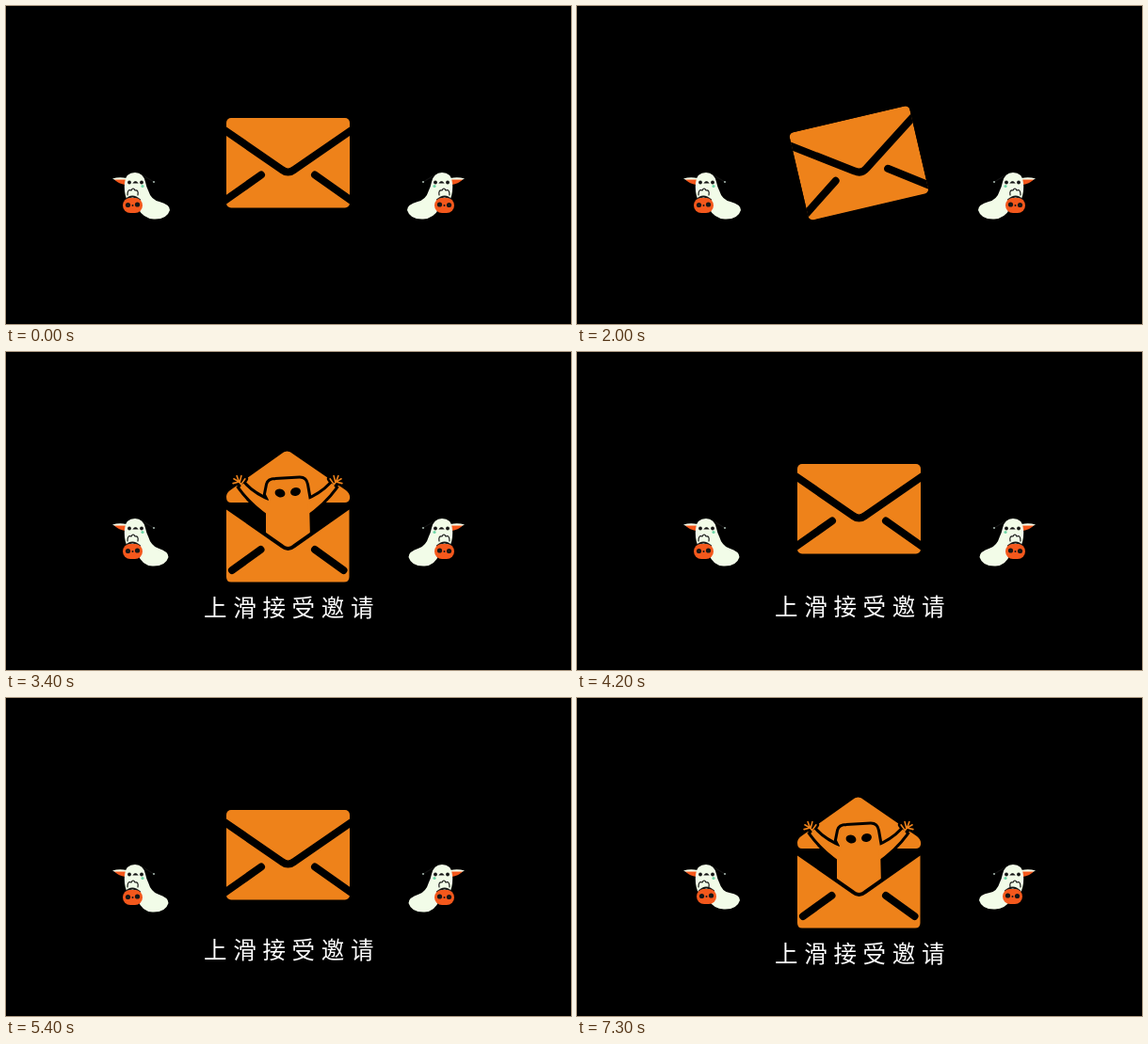
Write an HTML page that moves like this. It is 600 px wide and 338 px high and loops after 7.35 s.

```html
<!DOCTYPE html>
<html lang="zh">
<head>
<meta charset="utf-8">
<style>
  html, body { margin: 0; width: 100%; height: 100%; overflow: hidden; background: #000; }
  svg { display: block; width: 100vw; height: 100vh; }
  text { font: 24.5px "Noto Sans CJK SC", "Noto Sans CJK", sans-serif; letter-spacing: 6.7px; fill: #fff; }
  .orange { fill: #ee821a; }
  .line { fill: none; stroke-linecap: round; stroke-linejoin: round; }
  .ink { stroke: #000; stroke-width: 8; }
  .glow { stroke: #ee821a; }
  .thin { stroke: #161616; stroke-width: 1.2; }
</style>
</head>
<body>
<svg viewBox="0 0 600 338">
  <defs>
    <clipPath id="card"><rect x="234" y="119" width="131" height="95.5" rx="5"/></clipPath>
    <path id="hand" d="M4 5L0 0L-8 2M0 0L-7 -4M0 0L-3 -8M1 0L3 -8M3 3L8 -4"/>
    <path id="arm"/>
    <path id="body" d="M279 141Q280 137 286 137L312 135.5Q317 135.5 318 141L321 158L322 199L299 212L277 199V166L280 157L277 151Z"/>
    <g id="spook">
      <path d="M113 183.5Q120 181.5 128 183L128 187L120 187Z" fill="#f4fbe9"/>
      <path d="M115 184.5L127 184.5L126.500 190Q120 189 115 184.500Z" fill="#f4581c"/>
      <path class="line thin" d="M147 181L157 187" stroke-opacity=".8"/>
      <circle cx="157" cy="187" r="1.1" fill="#9fb0a8"/>
      <path id="sheet" fill="#f2fce8"/>
      <g fill="#161616">
        <circle cx="131" cy="187.5" r="1.9"/><circle cx="144" cy="187.5" r="1.9"/>
        <path class="thin" d="M135.5 188Q137.500 185.500 139.500 188Z"/>
      </g>
      <circle cx="145" cy="191.5" r="1.6" fill="#6fd8a8"/>
      <path class="line thin" d="M129 201Q129 194 133 196Q135 192 137 196Q141 195 140 201"/>
      <g id="pumpkin">
        <path class="line" d="M127 206Q134 199 142 206" stroke="#161616" stroke-width="2"/>
        <rect x="124" y="204" width="21" height="16" rx="8" fill="#f4581c"/>
        <g fill="#161616">
          <circle cx="129.5" cy="211.5" r="2.6"/><circle cx="139.5" cy="211" r="2.6"/>
          <circle cx="134.5" cy="212" r="1"/>
        </g>
      </g>
    </g>
    <g id="side">
      <use href="#arm"/>
      <use href="#hand" class="palm line"/>
    </g>
    <g id="figure">
      <use href="#side"/>
      <use href="#side" transform="matrix(-1 0 0 1 598 0)"/>
      <use href="#body" class="lift"/>
    </g>
  </defs>

  <g id="closed">
    <g clip-path="url(#card)">
      <rect class="orange" x="234" y="119" width="131" height="96"/>
      <path class="line ink" d="M230 130.5L293 174Q299.5 179 306 174L369 130.5M230 208.5L271 179.5M369 208.5L328 179.5"/>
    </g>
  </g>

  <g id="open">
    <path id="flap" class="orange" d="M292 108.5Q298.5 102.5 305 108.5L361 147Q366 151 365 156Q364 160 360 160H239Q234 160 234 154Q234 150 238 147Z"/>
    <g id="ghost">
      <use href="#figure" fill="#000" stroke="#000" stroke-width="8"/>
      <use href="#figure" class="orange glow" stroke-width="2"/>
      <g class="lift">
        <ellipse cx="291" cy="150" rx="5.5" ry="4.3" transform="rotate(15 291 150)"/>
        <ellipse cx="307.5" cy="148.5" rx="5.5" ry="4.4" transform="rotate(-15 307.5 148.5)"/>
      </g>
    </g>
    <g id="base">
      <path class="orange" stroke="#000" stroke-width="8" paint-order="stroke"
        d="M234 167.5L292 208Q299.5 214 307 208L364.5 167.5V239Q364.5 244.5 359 244.5H239Q234 244.5 234 239Z"/>
      <path class="line ink" d="M240 232L270.500 210M358.500 232L328 210"/>
    </g>
    <path id="rays" class="line glow" stroke-width="5"
      d="M246 96.500L263 101M239 115Q243 113.500 248 114M224 135L233 134M341 114Q347 107 356 105.500M365 122L373 116M371 131h.1"/>
  </g>

  <use href="#spook"/>
  <use href="#spook" transform="matrix(-1 0 0 1 600 0)"/>
  <text id="label" x="210" y="280.5">上滑接受邀请</text>
</svg>
<script>
const $ = id => document.getElementById(id);
const LOOP = 7350, REPLAY = 4200, OPEN = 2300;

// Eased value through [time, value] pairs
function track(keys, t) {
  const i = keys.findIndex(k => k[0] > t);
  if (i < 0) return keys[keys.length - 1][1];
  if (i === 0) return keys[0][1];
  const [t0, a] = keys[i - 1], [t1, b] = keys[i];
  return a + (b - a) * (1 - Math.cos(Math.PI * (t - t0) / (t1 - t0))) / 2;
}
const place = (el, x, y, scale = 1) => el.setAttribute('transform', `translate(${x} ${y}) scale(${scale})`);
const show = (id, on) => $(id).style.display = on ? '' : 'none';

const shake = [[0, 0], [150, 11], [290, -19], [580, 14], [640, 0]];
const lift = [[2650, -8], [2800, 0]];
const rise = [[2300, 22], [2650, 13], [2800, 0]];
const bob = [[0, -1], [350, -3], [750, 2], [1250, -4], [1650, -1], [2080, -3.5], [2450, 2], [2850, -2], [3100, 0]];
// Tail x, tail y, pumpkin x, pumpkin y
const poses = [[0, 0, 0, 0], [-1, -2, 3, -1], [-1.5, 1, 0, 0], [-3, -2, -2, -1]];

function drawSpook(t) {
  const [x, y, px, py] = poses[Math.floor(t / 100) % 4];
  $('sheet').setAttribute('d', `M126 188Q127 177 137 177Q146 177.500 148 187Q149 192 151 196
    Q154 206 ${163 + x} ${208 + y / 2}Q${174 + x} ${211 + y} ${174 + x} ${217 + y}
    Q${171 + x} ${227 + y} ${157 + x} ${226.5 + y}Q${146 + x} ${226 + y} 140 215L128 205Q125 197 126 188`);
  place($('pumpkin'), px, py);
}

function drawOpen(l) {
  const dy = track(lift, l), up = track(rise, l);
  const hand = 138 + up * .75, wrist = hand + 5;
  for (const id of ['flap', 'base']) place($(id), 0, dy);
  document.querySelectorAll('.lift').forEach(el => place(el, 0, up));
  place(document.querySelector('.palm'), 247.5 - up * .15, hand, .8 + up * .025);
  $('arm').setAttribute('d', `M252 ${wrist - 2}Q263 ${wrist + 10} 281 ${160 + up}V${174 + up}
    Q261 ${wrist + 17} 249.5 ${wrist + 1}Z`);
  show('ghost', l >= 2350);
  show('rays', l >= 2450 && l < 2750);
}

function frame(now) {
  const t = Math.floor(now % LOOP / 50) * 50;
  const again = t >= REPLAY, l = again ? t - REPLAY : t;
  const angle = track(shake, l - (l < 1500 ? 560 : 1630));
  $('closed').setAttribute('transform', `rotate(${angle} 300 167)`);
  show('closed', l < OPEN);
  show('open', l >= OPEN);
  drawOpen(l);
  drawSpook(t);
  $('label').style.opacity = Math.min(1, Math.max(0, (t - 2200) / 250));
  place($('label'), 0, again ? track(bob, l) : 0);
  requestAnimationFrame(frame);
}
requestAnimationFrame(frame);
</script>
</body>
</html>
```
